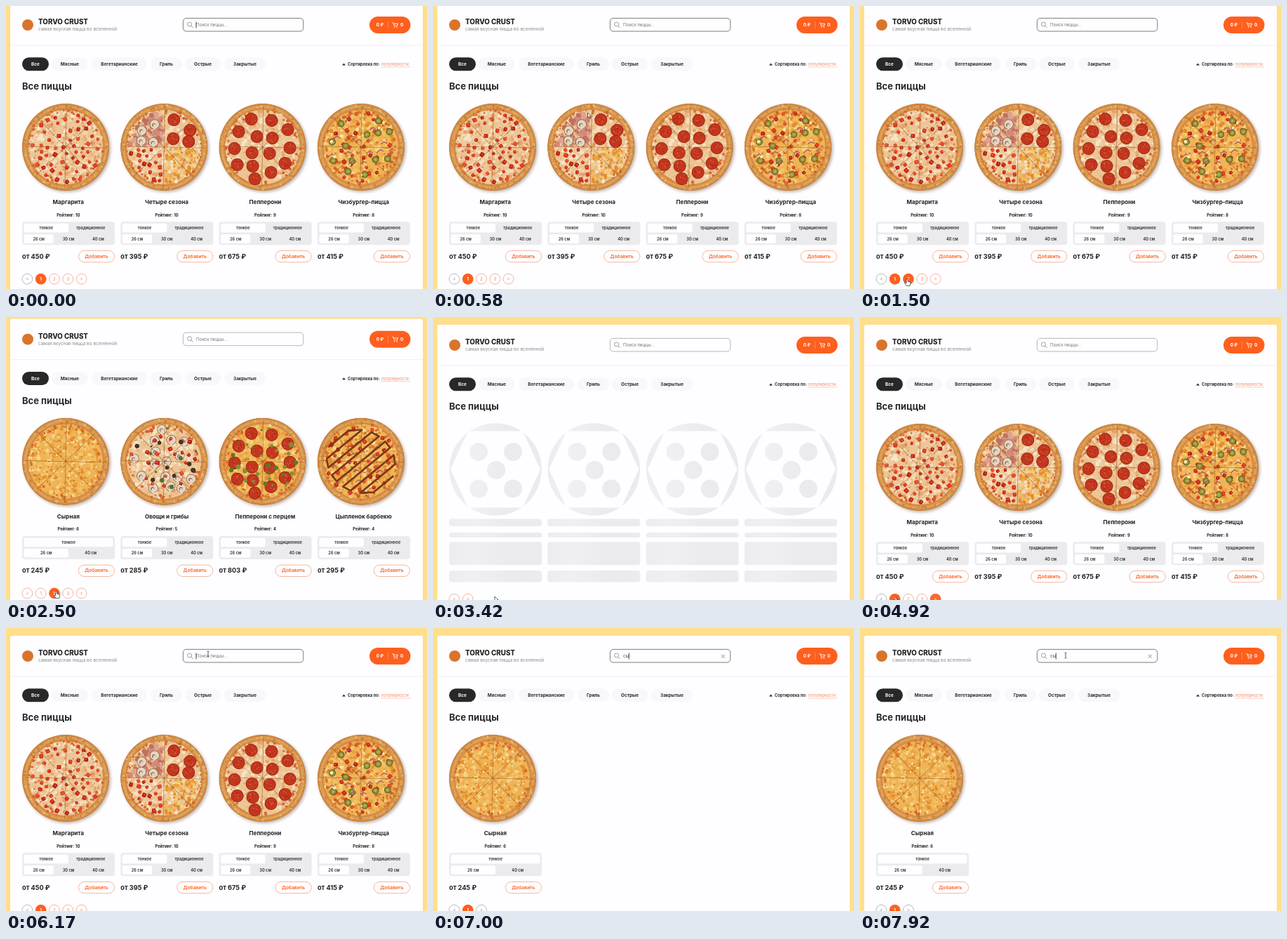
These frames come from a looping animation (600x403 px, 8000 ms). An HTML page with a canvas:

```html
<!DOCTYPE html>
<html lang="ru">
<head>
<meta charset="utf-8">
<title>Пиццерия</title>
<style>
html, body { margin: 0; width: 100%; height: 100%; overflow: hidden; }
canvas { display: block; width: 600px; height: 403px; }
</style>
</head>
<body>
<canvas id="stage"></canvas>
<script>
const LOOP = 8000, ORANGE = '#fe5f1e', DARK = '#232323', GREY = '#ebeaed', PAPER = '#fefdff';
const stage = document.getElementById('stage');
const dpr = window.devicePixelRatio || 1;
stage.width = 600 * dpr;
stage.height = 403 * dpr;
const ctx = stage.getContext('2d');

// ---- drawing helpers ----
function text(s, x, y, size, weight = 600, color = DARK, align = 'left') {
  ctx.font = `${weight} ${size}px Inter, "Open Sans", sans-serif`;
  ctx.fillStyle = color;
  ctx.textAlign = align;
  ctx.fillText(s, x, y);
}
function box(x, y, w, h, r, fill, stroke) {
  ctx.beginPath();
  ctx.roundRect(x, y, w, h, r);
  if (fill) { ctx.fillStyle = fill; ctx.fill(); }
  if (stroke) { ctx.strokeStyle = stroke; ctx.lineWidth = 0.8; ctx.stroke(); }
}
function disc(g, x, y, r, fill) {
  g.beginPath();
  g.arc(x, y, r, 0, 7);
  g.fillStyle = fill;
  g.fill();
}
function line(g, points, color, width = 1) {
  g.beginPath();
  points.forEach(([x, y]) => g.lineTo(x, y));
  g.strokeStyle = color;
  g.lineWidth = width;
  g.stroke();
}

// ---- pizzas ----
const slices = [[-16, -40], [13, -38], [-34, -22], [-8, -15], [36, -25], [-40, 2], [14, -13],
  [10, 9], [-15, 8], [39, 1], [-36, 25], [-14, 27], [-11, 45], [12, 36], [32, 23]];
const TOMATO = ['#c9281a', '#d8371f', '#b52013', '#e04a2a'];
const CHEESE = ['#f6e4c8', '#f1d0a0', '#e9b983', '#f4dfbd', '#e3a56c', '#efc9a4'];
const GOLD = ['#f3c267', '#eaa240', '#f5d488', '#e18d30', '#f0b551'];

function makePizza(kind) {
  const c = document.createElement('canvas');
  c.width = c.height = 280;
  const g = c.getContext('2d');
  g.scale(2, 2);
  g.translate(70, 70);
  g.lineJoin = g.lineCap = 'round';
  let seed = 11 + kind.length;
  const rnd = () => (seed = (seed * 16807) % 2147483647) / 2147483647;
  const pick = a => a[Math.floor(rnd() * a.length)];

  // Places n spots in a ring, at least gap apart
  function scatter(n, inner, outer, gap, put, test = () => true) {
    const done = [];
    for (let i = 0; i < n * 30 && done.length < n; i++) {
      const a = rnd() * 6.283, r = Math.sqrt(inner ** 2 + rnd() * (outer ** 2 - inner ** 2));
      const x = r * Math.cos(a), y = r * Math.sin(a);
      if (!test(x, y) || done.some(p => Math.hypot(p[0] - x, p[1] - y) < gap)) continue;
      done.push([x, y]);
      put(x, y);
    }
  }
  const spots = (size, colors) => (x, y) => disc(g, x, y, size * (0.5 + rnd()), pick(colors));
  const chunk = (x, y) => {
    const size = 4.6 + rnd() * 2;
    g.save();
    g.translate(x, y);
    g.rotate(rnd() * 3);
    g.beginPath();
    g.roundRect(-size / 2, -size / 2, size, size * 0.9, 1.6);
    g.fillStyle = pick(TOMATO);
    g.fill();
    disc(g, -0.6, -0.6, 0.9, '#ec6a45');
    g.restore();
  };
  const salami = (x, y, r = 9) => {
    disc(g, x, y, r, '#9c2614');
    disc(g, x, y, r - 0.9, '#c4361f');
    for (let i = 0; i < 8; i++)
      disc(g, x + (rnd() - 0.5) * r * 1.2, y + (rnd() - 0.5) * r * 1.2, 1, pick(['#d65a36', '#ad2a18']));
  };
  const mushroom = (x, y) => {
    disc(g, x, y, 7, '#8d6d52');
    disc(g, x, y, 6.2, '#e6d6c2');
    disc(g, x - 1, y + 1, 2.8, '#9d7a5b');
    g.fillStyle = '#e6d6c2';
    g.fillRect(x - 2, y, 3.4, 7);
  };
  const pickle = (x, y) => {
    disc(g, x, y, 5, '#5b6620');
    disc(g, x, y, 3.9, '#98913c');
    disc(g, x, y, 1.6, '#bdb05c');
  };
  const sauce = (color, width) => {
    const zig = [];
    for (let k = -4; k <= 4; k++) {
      const d = k * 11, h = Math.sqrt(48 ** 2 - d * d), ends = [-h, h];
      if (k % 2) ends.reverse();
      ends.forEach(e => zig.push([(e + d) * 0.72, (d - e * 0.8) * 0.74]));
    }
    line(g, zig, color, width);
  };

  g.shadowColor = 'rgba(70,40,20,.35)';
  g.shadowBlur = 8;
  g.shadowOffsetX = g.shadowOffsetY = 4;
  disc(g, 0, 0, 62, '#c98743');
  g.shadowColor = 'transparent';
  const crust = g.createRadialGradient(0, 0, 52, 0, 0, 62);
  crust.addColorStop(0, '#bd6f2c');
  crust.addColorStop(0.55, '#e2a75e');
  crust.addColorStop(1, '#c47a34');
  disc(g, 0, 0, 62, crust);
  scatter(110, 57, 60, 0, spots(1.3, ['#d99a4f', '#e6b26e', '#cb843c']));
  const pale = ['margherita', 'seasons', 'pepperoni', 'veggie'].includes(kind);
  disc(g, 0, 0, 55, '#d98a45');
  disc(g, 0, 0, 53, pale ? '#ecc594' : '#eeb457');
  scatter(420, 0, 52, 0, spots(2.2, pale ? CHEESE : GOLD));
  scatter(70, 47, 55, 0, spots(1.5, ['#d27c33', '#d8622c']));

  if (kind === 'margherita') {
    scatter(80, 0, 50, 0, spots(1.2, ['#db7a4c', '#e29862']));
    scatter(54, 0, 50, 8.5, chunk);
  }
  if (kind === 'veggie') {
    scatter(16, 0, 46, 15, mushroom);
    scatter(24, 0, 48, 9, chunk);
    scatter(16, 0, 48, 10, spots(2.5, ['#56722c', '#413728']));
  }
  if (kind === 'seasons') {
    scatter(90, 0, 49, 0, spots(3, ['#d28a78', '#dfa28e', '#c0705f']), (x, y) => x < -3 && y < -3);
    scatter(6, 0, 45, 14, mushroom, (x, y) => x < -6 && y < -6);
    [[14, -39], [37, -24], [13, -12], [35, -8]].forEach(p => salami(...p));
    scatter(17, 0, 49, 7.5, chunk, (x, y) => x < -3 && y > 3);
    scatter(150, 0, 51, 0, spots(2, GOLD), (x, y) => x > 2 && y > 2);
  }
  if (kind === 'pepperoni' || kind === 'fresh' || kind === 'crazy') slices.forEach(p => salami(...p));
  if (kind === 'fresh') scatter(30, 0, 49, 9, spots(2.4, ['#587b2a', '#79943a']));
  if (kind === 'burger' || kind === 'barbecue') {
    scatter(60, 0, 50, 0, spots(1.6, ['#d9752b', '#c9642a']));
    scatter(34, 0, 50, 9, chunk);
    if (kind === 'burger') scatter(13, 14, 48, 16, pickle);
    scatter(14, 0, 45, 12, (x, y) => line(g, [[x - 4, y + 2], [x, y - 1], [x + 4, y + 1]], '#a4546c', 1.3));
    scatter(16, 0, 48, 8, spots(1.9, ['#fbe6b8', '#f7d995']));
  }
  if (kind === 'cheese') scatter(170, 0, 50, 0, spots(1, ['#dd7d1c', '#e5902c', '#f8e0a6']));
  if (kind === 'sweet') scatter(55, 0, 49, 7, spots(2.1, ['#d97a2b', '#f7e1a8']));
  if (['sweet', 'crazy', 'barbecue'].includes(kind)) sauce(kind === 'barbecue' ? '#7c3818' : '#d9651e', 2.7);

  for (let i = 0; i < 4; i++) {
    const a = i * Math.PI / 4 + 0.02, x = 58 * Math.cos(a), y = 58 * Math.sin(a);
    line(g, [[-x, -y], [x, y]], 'rgba(160,85,30,.55)', 1);
  }
  return c;
}

// ---- page data ----
const both = ['тонкое', 'традиционное'], all = [26, 30, 40];
const item = (name, rating, price, kind, types = both, sizes = all) =>
  ({ name, rating, price, types, sizes, image: makePizza(kind) });
const cheese = item('Сырная', 6, 245, 'cheese', ['тонкое'], [26, 40]);
const pages = [
  [item('Маргарита', 10, 450, 'margherita'), item('Четыре сезона', 10, 395, 'seasons'),
   item('Пепперони', 9, 675, 'pepperoni'), item('Чизбургер-пицца', 8, 415, 'burger')],
  [cheese, item('Овощи и грибы', 5, 285, 'veggie'),
   item('Пепперони с перцем', 4, 803, 'fresh'), item('Цыпленок барбекю', 4, 295, 'barbecue')],
  [item('Кисло-сладкий цыпленок', 2, 275, 'sweet', ['традиционное']),
   item('Крэйзи пепперони', 2, 580, 'crazy', ['традиционное'], [30, 40])]
];
const loads = [[1750, 2170], [3250, 3670], [4670, 4910], [6750, 7000]];
const pills = [['Все', 23, 38], ['Мясные', 65, 52], ['Вегетарианские', 122, 79],
  ['Гриль', 206, 45], ['Острые', 255, 51], ['Закрытые', 311, 59]];

// ---- timing ----
const track = [[80, 294, 39], [1400, 66, 389], [2330, 66, 389], [2900, 88, 398],
  [3750, 88, 398], [4500, 50, 399], [5000, 50, 399], [5900, 288, 37]];
const ease = p => p * p * (3 - 2 * p);
const clamp = p => Math.max(0, Math.min(1, p));

function pointerAt(t) {
  if (t < 80 || (t >= 6250 && t < 7830)) return null;
  if (t >= 7830) return [293, 39];
  const i = track.findIndex(k => k[0] > t);
  if (i < 0) return [288, 37];
  const [t0, x0, y0] = track[i - 1], [t1, x1, y1] = track[i];
  const p = ease((t - t0) / (t1 - t0));
  return [x0 + (x1 - x0) * p, y0 + (y1 - y0) * p];
}

// ---- page parts ----
function header(t) {
  disc(ctx, 31, 40, 8, '#d9742b');
  text('TORVO CRUST', 46, 39.2, 9.8, 800);
  text('самая вкусная пицца во вселенной', 46, 48.2, 6.45, 400, '#8b8b8b');

  const focus = t < 1700 || t >= 5900;
  const query = t < 6250 ? '' : t < 6500 ? 'с' : 'сы';
  box(252.4, 30.4, 171.4, 18.6, 4.5, PAPER, focus ? '#5c5c5c' : '#a5a5a5');
  ctx.beginPath();
  ctx.arc(261.5, 39, 3, 0, 7);
  ctx.strokeStyle = '#777';
  ctx.lineWidth = 0.7;
  ctx.stroke();
  line(ctx, [[263.7, 41.2], [266.4, 43.9]], '#777', 0.8);
  text(query || 'Поиск пиццы...', 271, 42.2, 6.1, 400, query ? '#444' : '#777');
  const caretX = query ? 271.3 + ctx.measureText(query).width : 271;
  const since = t < 5000 ? 0 : t < 6250 ? 5900 : 6580;
  if (focus && (t - since) / 500 % 2 < 1) line(ctx, [[caretX, 35.5], [caretX, 44.5]], '#222', 0.8);
  if (query) {
    line(ctx, [[411, 37.8], [416, 42.8]], '#777', 0.8);
    line(ctx, [[416, 37.8], [411, 42.8]], '#777', 0.8);
  }

  box(518, 28, 58.5, 24, 12, ORANGE);
  text('0 ₽', 533, 42.2, 6.3, 700, '#fff', 'center');
  line(ctx, [[544.5, 34.5], [544.5, 45.5]], '#ff9a6c', 0.7);
  line(ctx, [[550.5, 36.8], [552, 36.8], [553.2, 41.2], [557.6, 41.2], [558.4, 38.2], [552.4, 38.2]], '#fff', 0.9);
  disc(ctx, 553.6, 43.3, 0.8, '#fff');
  disc(ctx, 557.2, 43.3, 0.8, '#fff');
  text('0', 564, 42.2, 6.3, 700, '#fff', 'center');
  line(ctx, [[6, 69], [594, 69]], '#eeedf0', 1);
}

function filters() {
  pills.forEach(([label, x, w], i) => {
    box(x, 86.3, w, 19, 9.5, i ? '#f8f7f9' : '#282828');
    text(label, x + w / 2, 98, 6.4, 700, i ? '#2c2c2c' : '#fff', 'center');
  });
  ctx.beginPath();
  [[479, 97.6], [481.5, 94.6], [484, 97.6]].forEach(p => ctx.lineTo(...p));
  ctx.fillStyle = '#2c2c2c';
  ctx.fill();
  text('Сортировка по:', 487, 98, 5.8, 700, '#2c2c2c');
  text('популярности', 535, 98, 5.7, 400, '#f58a5e');
  ctx.setLineDash([1, 1]);
  line(ctx, [[535, 100], [576.5, 100]], ORANGE, 0.6);
  ctx.setLineDash([]);
  text('Все пиццы', 23, 132.2, 13, 700, '#282828');
}

function options(labels, x, y, chosen) {
  const w = 127 / labels.length;
  labels.forEach((label, i) => {
    if (i === chosen) box(x + 2.5 + i * w, y, w, 12.7, 2.5, PAPER);
    text(label, x + 2.5 + (i + 0.5) * w, y + 8.5, 5.7, 600, '#2c2c2c', 'center');
  });
}

function card(p, x) {
  const mid = x + 65.8;
  ctx.drawImage(p.image, x - 8, 144, 140, 140);
  text(p.name, mid, 295.3, 8.1, 700, DARK, 'center');
  text('Рейтинг: ' + p.rating, mid, 312.6, 5.8, 700, DARK, 'center');
  box(x, 320.3, 132, 33, 4, GREY);
  options(p.types, x, 322.8, p.types[0] === 'тонкое' ? 0 : -1);
  options(p.sizes.map(s => s + ' см'), x, 338.2, 0);
  text(`от ${p.price} ₽`, x, 372.6, 9.2, 700);
  box(x + 80.4, 361.4, 51.2, 16.4, 8.2, PAPER, '#f4a482');
  text('Добавить', x + 106, 371.7, 6.8, 600, ORANGE, 'center');
}

function skeleton(x, age) {
  const c = x + 130 * (-0.05 + age / 550);
  const shine = ctx.createLinearGradient(c - 45, 0, c + 45, 0);
  shine.addColorStop(0, GREY);
  shine.addColorStop(0.5, '#f0eff1');
  shine.addColorStop(1, GREY);
  disc(ctx, x + 66, 217, 65.8, shine);
  ctx.beginPath();
  [[2, 217], [27, 162.5], [105, 162.5], [130, 217], [105, 271.5], [27, 271.5]]
    .forEach(([px, py]) => ctx.lineTo(x + px, py));
  ctx.fillStyle = PAPER;
  ctx.fill();
  [[42, 192], [91, 192], [67, 218], [42, 244.5], [91, 244.5]]
    .forEach(([px, py]) => disc(ctx, x + px, py, 13, shine));
  [[287.5, 10.5], [307, 7], [320.3, 33], [361, 16.5]]
    .forEach(([y, h]) => box(x, y, 132, h, Math.min(4, h / 2), shine));
}

function pagination(count, active, t, mouse) {
  const labels = ['<', ...Array.from({ length: count }, (_, i) => i + 1), '>'];
  let hovered = false;
  labels.forEach((label, i) => {
    const x = 30.4 + i * 19.3, last = i === count + 1;
    const off = count && ((i === 0 && active === 1) || (last && active === count));
    const hover = mouse && !off && Math.abs(mouse[0] - x) < 7.5 && Math.abs(mouse[1] - 401.7) < 10;
    hovered = hovered || hover;
    const fade = last && t >= 4910 && t < 5200 ? clamp(1 - (t - 4910) / 200) : 0;
    const strength = hover || (count && i === active) ? 1 : fade;
    box(x - 7.4, 394.3, 14.8, 14.8, 7.4, PAPER, off ? '#a8a6ac' : '#f2a184');
    ctx.globalAlpha = strength;
    disc(ctx, x, 401.7, 7.7, ORANGE);
    ctx.globalAlpha = 1;
    text(label, x, 403.9, 6.2, i === active ? 700 : 400,
      strength > 0.5 ? '#fff' : off ? '#8b8990' : '#f2805a', 'center');
  });
  return hovered;
}

function pointer(x, y, shape) {
  ctx.save();
  ctx.translate(x, y);
  if (shape === 'beam') {
    line(ctx, [[-1.5, -4], [0, -3.4], [1.5, -4]], '#333', 0.7);
    line(ctx, [[0, -3.4], [0, 3.4]], '#333', 0.8);
    line(ctx, [[-1.5, 4], [0, 3.4], [1.5, 4]], '#333', 0.7);
  } else {
    const path = new Path2D(shape === 'hand'
      ? 'M0 0 Q1 -1 2 0 V3 L5 4 Q6.4 4.4 6 6 L5 9.5 H0.5 L-2.4 5.8 Q-2.6 4.6 -1.4 4.8 L0 6Z'
      : 'M0 0 V7 L1.7 5.5 L3 8.2 L4.1 7.7 L2.9 5 H5Z');
    ctx.fillStyle = '#fff';
    ctx.fill(path);
    ctx.strokeStyle = '#222';
    ctx.lineWidth = 0.7;
    ctx.stroke(path);
  }
  ctx.restore();
}

function draw(t) {
  const scroll = 13 * (1 - ease(clamp((t - 2330) / 420)));
  const mouse = pointerAt(t);
  const local = mouse && [mouse[0], mouse[1] + scroll];
  const found = t >= 6750;
  const page = t < 1750 ? 1 : t < 3250 ? 2 : t < 4670 ? 3 : 1;
  const load = loads.find(([a, b]) => t >= a && t < b);

  ctx.setTransform(dpr, 0, 0, dpr, 0, 0);
  ctx.fillStyle = '#ffdf8c';
  ctx.fillRect(0, 0, 600, 403);
  ctx.translate(0, -scroll);
  box(6, 11, 588, 440, 3, PAPER);
  header(t);
  filters();
  if (load) for (let i = 0; i < 4; i++) skeleton(23 + i * 140.3, t - load[0]);
  else (found ? [cheese] : pages[page - 1]).forEach((p, i) => card(p, 23 + i * 140.3));
  const over = pagination(load ? 0 : found ? 1 : 3, page, t, local);
  if (!mouse) return;
  const inSearch = mouse[0] > 252 && mouse[0] < 424 && local[1] > 30 && local[1] < 49;
  pointer(...local, inSearch ? 'beam' : over ? 'hand' : 'arrow');
}

function tick(now) {
  draw(now % LOOP);
  requestAnimationFrame(tick);
}
requestAnimationFrame(tick);
</script>
</body>
</html>
```
